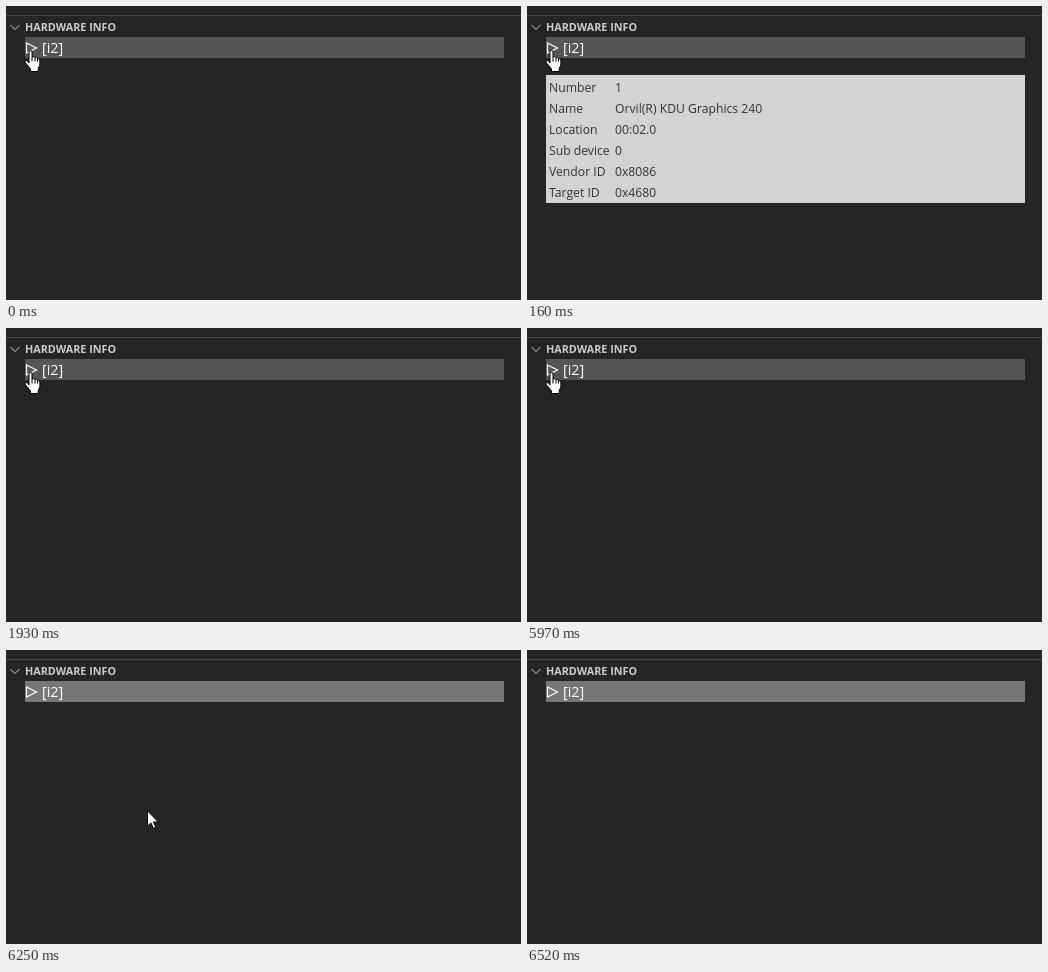
Animation of 515 by 294 pixels, one loop 7.2 s. Source, as an HTML page with a canvas:

```html
<!DOCTYPE html>
<html lang="en">
<head>
<meta charset="utf-8">
<title>Hardware info</title>
<style>
  html, body { margin: 0; width: 100%; height: 100%; overflow: hidden; background: #252525; }
  canvas { display: block; width: 515px; height: 294px; }
</style>
</head>
<body>
<canvas id="stage" width="515" height="294"></canvas>
<script>
const ctx = document.getElementById('stage').getContext('2d', { alpha: false });
const LOOP = 7200;
const FONT = '"Open Sans", "Noto Sans", sans-serif';
const ROWS = [
  ['Number', '1'],
  ['Name', 'Orvil(R) KDU Graphics 240'],
  ['Location', '00:02.0'],
  ['Sub device', '0'],
  ['Vendor ID', '0x8086'],
  ['Target ID', '0x4680']
];

const HAND = new Path2D('M4.5 13V2Q4.5 .5 6 .5Q7.5 .5 7.5 2V7Q9.9 5.9 10.5 7.7Q12.6 6.8 13 8.7Q15 8.2 15.4 10V15L13.7 18.5V21.5H6V19L.9 12.7Q.1 11 1.5 10.4Q3 10 4.5 13Z');
const KNUCKLES = new Path2D('M7.5 7V11.5M10.5 7.7V11.5M13 8.7V11.5');
const ARROW = new Path2D('M.5 .8V16.2L4 12.9L6.4 18.3L8.8 17.3L6.5 12H11.3Z');

function rect(x, y, w, h, color) {
  ctx.fillStyle = color;
  ctx.fillRect(x, y, w, h);
}

function label(str, x, y, size, color, weight = 400) {
  ctx.font = `${weight} ${size}px ${FONT}`;
  ctx.fillStyle = color;
  ctx.fillText(str, x, y);
}

function line(points, color, width, close) {
  ctx.beginPath();
  points.forEach(([x, y]) => ctx.lineTo(x, y));
  if (close) ctx.closePath();
  ctx.strokeStyle = color;
  ctx.lineWidth = width;
  ctx.stroke();
}

function cursor(shape, x, y, detail) {
  ctx.save();
  ctx.translate(x, y);
  ctx.fillStyle = '#fff';
  ctx.strokeStyle = '#000';
  ctx.lineWidth = 1;
  ctx.fill(shape);
  ctx.stroke(shape);
  if (detail) ctx.stroke(detail);
  ctx.restore();
}

function panel() {
  rect(19, 69, 479, 128, '#d3d3d3');
  ROWS.forEach(([key, value], i) => {
    const y = 86 + 21 * i;
    label(key, 22, y, 12.2, '#333');
    label(value, 88, y, 12.2, '#333');
  });
}

function draw(t) {
  const hover = t < 6250;
  rect(0, 0, 515, 294, '#252525');
  rect(0, 9, 515, 1, '#454545');
  line([[4.5, 19], [9, 23.5], [13.5, 19]], '#ccc', 1);
  label('HARDWARE INFO', 19, 25, 10.8, '#ccc', 700);

  rect(19, 31, 479, 21, hover ? '#555' : '#777');
  line([[20.5, 37], [30.5, 42], [20.5, 47]], '#fff', 1.2, true);
  label('[i2]', 36, 47, 14.3, '#fff');

  if ((t >= 160 && t < 1930) || (t >= 3940 && t < 5970)) panel();

  if (hover) cursor(HAND, 18.5, 44, KNUCKLES);
  else if (t < 6380) cursor(ARROW, 141, 160);
  else if (t < 6520) cursor(ARROW, 257, 270);
}

const start = performance.now();
function tick() {
  draw((performance.now() - start) % LOOP);
  requestAnimationFrame(tick);
}
tick();
</script>
</body>
</html>
```
